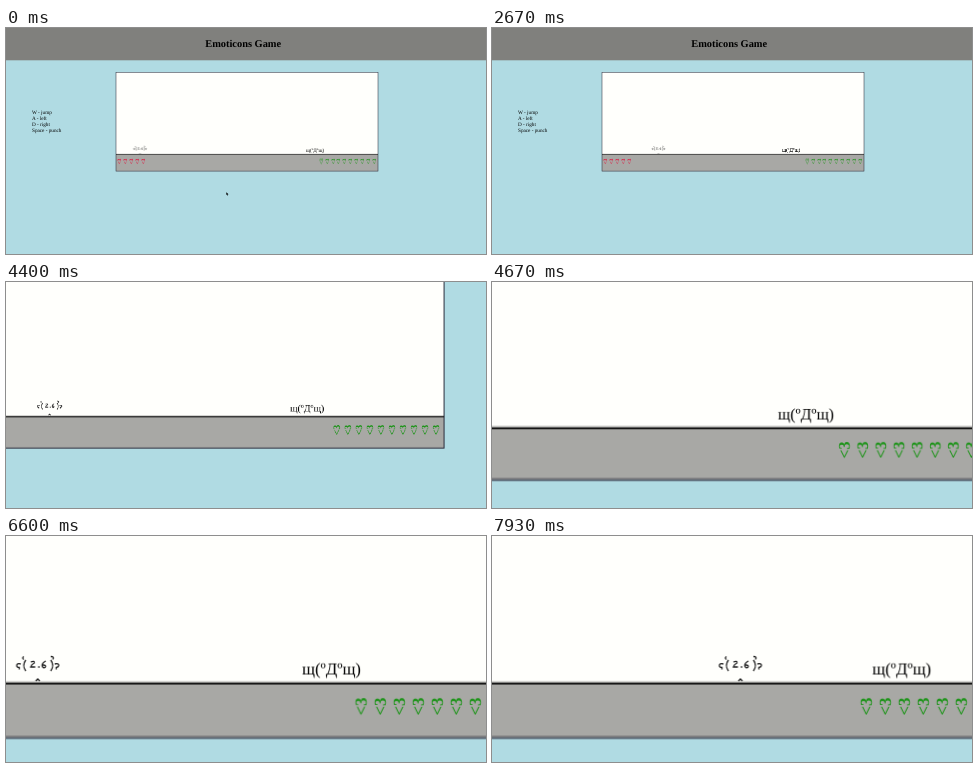
An HTML page that plays this animation: 480x226 px, repeating every 8 s.

```html
<!DOCTYPE html>
<html lang="en">
<head>
<meta charset="utf-8">
<title>Emoticons Game</title>
<style>
  html, body { margin: 0; width: 100%; height: 100%; overflow: hidden; background: #b0dbe3; }
  svg { display: block; width: 480px; height: 226px; }
  text { font: 5.2px "Liberation Serif", serif; text-rendering: geometricPrecision; }
  .title { font-size: 10.4px; font-weight: bold; text-anchor: middle; }
  .heart { font-weight: bold; text-anchor: middle; }
  .red { fill: #e0123c; }
  .green { fill: #1e941a; }
  .face { fill: none; stroke: #222; stroke-width: 1.3; }

  #camera, #player, #hop, #enemy, #pointer, .lost { animation: 8s linear infinite; }
  #camera { transform-origin: 297px 117px; animation-name: zoom; }
  #player { animation-name: walk; }
  #hop { animation-name: hop; }
  #enemy { animation-name: wander; animation-timing-function: step-end; }
  #pointer { animation-name: hide; animation-timing-function: step-end; }
  .lost { animation-name: lose; animation-timing-function: step-end; }

  @keyframes zoom {
    0% { transform: scale(1); animation-timing-function: step-end; }
    53.3% { transform: scale(1.275); animation-timing-function: steps(6); }
    58.3% { transform: scale(3.09); animation-timing-function: step-end; }
    59.13%, 100% { transform: scale(3.24); }
  }
  @keyframes walk {
    0%, 7.5% { transform: translate(134px, 120.7px); }
    16.67%, 33.5% { transform: translate(166.5px, 120.7px); }
    39.2% { transform: translate(200px, 120.7px); }
    46.6%, 60% { transform: translate(162.2px, 120.7px); }
    72.5% { transform: translate(235.3px, 120.7px); }
    75.94% { transform: translate(257.6px, 120.7px); }
    82.5% { transform: translate(215.2px, 120.7px); }
    84.1%, 85% { transform: translate(206px, 120.7px); }
    98.3%, 100% { transform: translate(282px, 120.7px); }
  }
  @keyframes hop {
    0%, 68.75% { transform: translateY(0); animation-timing-function: ease-out; }
    70.8% { transform: translateY(-26px); }
    73.4% { transform: translateY(-26px); animation-timing-function: ease-in; }
    75.4%, 100% { transform: translateY(0); }
  }
  @keyframes wander {
    0% { transform: translateX(300px); }
    2.45% { transform: translateX(296.7px); }
    10.8% { transform: translateX(293.4px); }
    14.95% { transform: translateX(290.1px); }
    19.1% { transform: translateX(293.4px); }
    27.45% { transform: translateX(290.1px); }
    44.1% { transform: translateX(293.4px); }
    52.45% { transform: translateX(290.1px); }
    56.6% { transform: translateX(293.4px); }
    77.45% { transform: translateX(296.7px); }
    97.45%, 100% { transform: translateX(322.7px); }
  }
  @keyframes hide { 0% { opacity: 1; } 0.86%, 100% { opacity: 0; } }
  @keyframes lose { 0% { opacity: 1; } 97.45%, 100% { opacity: 0; } }
</style>
</head>
<body>
<svg viewBox="0 0 480 226">
  <g id="camera">
    <rect width="480" height="32.3" fill="#80807d"/>
    <text class="title" x="237.2" y="19.3">Emoticons Game</text>

    <text x="26" y="86.2">W - jump</text>
    <text x="26" y="92">A - left</text>
    <text x="26" y="97.9">D - right</text>
    <text x="26" y="103.7">Space - punch</text>

    <rect x="110" y="44.3" width="262" height="98.8" fill="#fffffc"/>
    <rect x="110" y="126.4" width="262" height="16.7" fill="#a8a8a5"/>
    <rect x="110" y="44.3" width="262" height="98.8" fill="none" stroke="#223" stroke-width=".5"/>
    <path d="M110 126.4H372" stroke="#000" stroke-width=".65"/>
    <g id="hearts"></g>

    <g id="player"><g id="hop">
      <g class="face" transform="scale(.3086)">
        <path d="M-17-1q-4-1-4 1.5q0 2 2.5 2v2"/>
        <path d="M-12-5q-4 5.5 0 11M-14-8.5q-2 1.5 0 3"/>
        <path d="M-7-3q4-1.5 3.5 1q-3 1.5-3.5 4h4.5"/>
        <path d="M.4 2h1.5"/>
        <path d="M8-4q-4 2-3.6 5q1 2.6 3 1.4q1.6-2.6-2.6-2.4"/>
        <path d="M13-5q4 5.5 0 11M13-8.5q4 0 2 3"/>
        <path d="M17-1q4-1 4 1.5q0 1.5-2.5 2v2"/>
        <path d="M-2 16l2-2l2 2"/>
      </g>
    </g></g>

    <text id="enemy" y="123.6">щ(ºДºщ)</text>
  </g>
  <path id="pointer" d="M220.3 164.2l2.2 2l-1 .2l.4 1l-.7.2l-.4-1l-.5.4z"/>
</svg>
<script>
  const hearts = document.getElementById("hearts");

  function addHearts(count, left, color) {
    for (let i = 0; i < count; i++) {
      const heart = document.createElementNS("http://www.w3.org/2000/svg", "text");
      heart.textContent = "<3";
      heart.setAttribute("class", "heart " + color);
      heart.setAttribute("dy", ".34em");
      heart.setAttribute("transform", `translate(${left + i * 5.87} 133.5) rotate(-90)`);
      hearts.append(heart);
    }
  }

  addHearts(5, 113.4, "red");
  addHearts(10, 315, "green");
  hearts.querySelector(".green").classList.add("lost");
</script>
</body>
</html>
```
